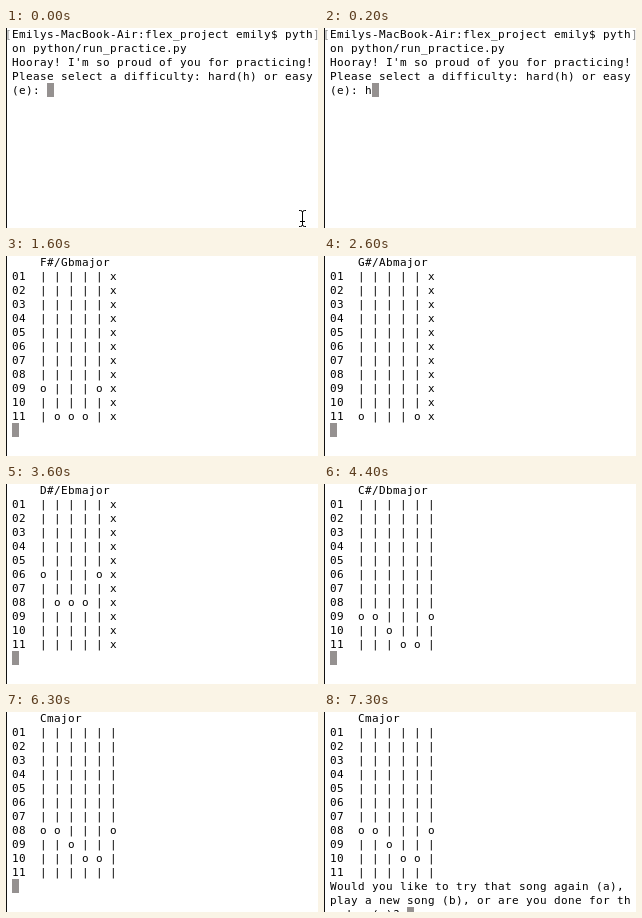
An HTML page with a canvas that plays this animation: 312 by 200 pixels, repeating every 7400 ms.

```html
<!DOCTYPE html>
<html lang="en">
<head>
<meta charset="utf-8">
<title>Chord practice</title>
<style>
html, body { margin: 0; width: 100%; height: 100%; overflow: hidden; background: #fff; }
canvas { display: block; }
</style>
</head>
<body>
<canvas id="stage" width="312" height="200"></canvas>
<script>
const ctx = document.getElementById('stage').getContext('2d');
const LOOP = 7400, CELL = 7, LINE = 14, LEFT = 6;

// Fret offsets of the two barre shapes, high string first; null is muted
const E = [0, 0, 1, 2, 2, 0];
const A = [0, 2, 2, 2, 0, null];

// Start time, chord name, shape, barre fret
const chords = [
  [500, 'E', E, 0],
  [1300, 'D', E, 10],
  [1600, 'F#/Gb', A, 9],
  [2300, 'G#/Ab', E, 4],
  [2600, 'G#/Ab', A, 11],
  [3600, 'D#/Eb', A, 6],
  [4300, 'C#/Db', E, 9],
  [4600, 'A', E, 5],
  [5300, 'G#/Ab', A, 11],
  [5600, 'D', E, 10],
  [6300, 'C', E, 8]
];

const intro = [
  'Emilys-MacBook-Air:flex_project emily$ pyth',
  'on python/run_practice.py',
  "Hooray! I'm so proud of you for practicing!",
  'Please select a difficulty: hard(h) or easy',
  '(e): '
];
const outro = [
  'Would you like to try that song again (a),',
  'play a new song (b), or are you done for th',
  'e day (c)? '
];

function put(text, col, row, color = '#000') {
  ctx.fillStyle = color;
  [...text].forEach((ch, i) => ctx.fillText(ch, LEFT + (col + i) * CELL, row * LINE + 10));
}

function fretboard([, name, shape, barre]) {
  const lines = ['    ' + name + 'major'];
  for (let fret = 1; fret <= 11; fret++) {
    const strings = shape.map(o => o === null ? 'x' : barre + o === fret ? 'o' : '|');
    lines.push(String(fret).padStart(2, '0') + '  ' + strings.join(' '));
  }
  return lines;
}

function pointer() {
  ctx.strokeStyle = '#000';
  ctx.lineWidth = 1;
  ctx.stroke(new Path2D(
    'M293 182.5h1.5q2 0 2 2q0-2 2-2h1.5M296.5 184v13M294 193.5h5M293 198.5h1.5q2 0 2-2q0 2 2 2h1.5'));
}

function draw(t) {
  ctx.fillStyle = '#fff';
  ctx.fillRect(0, 0, 312, 200);
  ctx.fillStyle = '#111';
  ctx.fillRect(0, 0, 1, 200);

  let lines;
  if (t < 500) {
    lines = intro.slice();
    if (t >= 100) lines[4] += 'h';
    else pointer();
    put('[', -1, 0, '#888');
    put(']', 43, 0, '#888');
  } else {
    lines = fretboard(chords.findLast(c => c[0] <= t));
    lines.push(...(t < 6600 ? [''] : outro));
  }

  const last = lines.length - 1;
  ctx.fillStyle = '#959190';
  ctx.fillRect(LEFT + lines[last].length * CELL, last * LINE - 1, CELL, LINE);
  lines.forEach((text, row) => put(text, 0, row));
}

ctx.font = '11px "DejaVu Sans Mono", monospace';
const start = performance.now();
function tick() {
  draw((performance.now() - start) % LOOP);
  requestAnimationFrame(tick);
}
tick();
</script>
</body>
</html>
```
